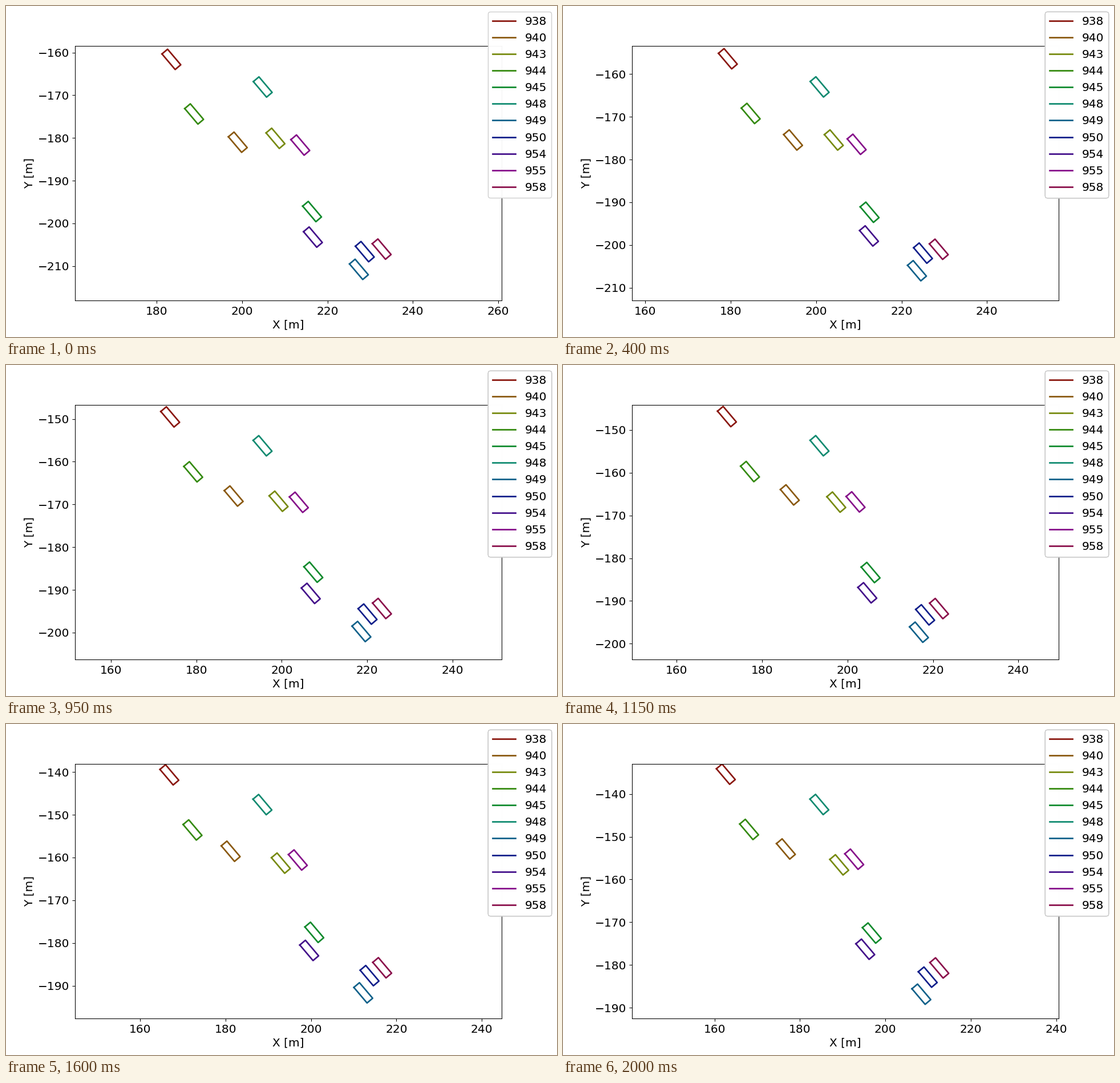
Animation of 966 by 580 pixels, one loop 2.05 s. Source, as a matplotlib script:

```python
import colorsys

import matplotlib.pyplot as plt
import numpy as np
from matplotlib.animation import FuncAnimation

W, H, DPI = 966, 580, 96.6
FRAMES, INTERVAL = 41, 50
LENGTH, WIDTH = 4.78, 1.72
BODY_ANGLE = 49.7
ROAD = np.radians(128.4)
HALF_X = 50
MAX_LEGENDS = 8

# id: start x, start y, metres driven in one loop
CARS = {
    938: (183.45, -161.60, 33.5),
    940: (199.01, -180.99, 35.9),
    943: (207.83, -180.08, 30.0),
    944: (188.78, -174.38, 33.3),
    945: (216.40, -197.22, 31.5),
    948: (204.85, -168.07, 32.7),
    949: (227.37, -210.75, 30.5),
    950: (228.75, -206.60, 30.3),
    954: (216.60, -203.20, 34.3),
    955: (213.64, -181.66, 33.7),
    958: (232.70, -206.01, 32.3),
}

plt.rcParams.update({"font.family": "DejaVu Sans", "font.size": 15})

# The tiny margin keeps the pixel size from rounding down
fig, ax = plt.subplots(figsize=((W + 1e-6) / DPI, (H + 1e-6) / DPI), dpi=DPI)
ax.set_xlabel("X [m]")
ax.set_ylabel("Y [m]")
area = ax.get_position()
HALF_Y = HALF_X * area.height * H / (area.width * W)

table = np.array(list(CARS.values()))
starts, driven = table[:, :2], table[:, 2:]
heading = np.array([np.cos(ROAD), np.sin(ROAD)])


def car_shape():
    a = np.radians(-BODY_ANGLE)
    u = np.array([np.cos(a), np.sin(a)]) * LENGTH / 2
    v = np.array([-np.sin(a), np.cos(a)]) * WIDTH / 2
    return np.array([-u - v, -u + v, u + v, u - v, -u - v])


def progress(i):
    """Share of the way driven, with a slight slowdown in mid-loop."""
    t = i / (FRAMES - 1)
    return t - 0.015 * np.sin(np.pi * t) ** 4


SHAPE = car_shape()
lines = []
for k, name in enumerate(CARS):
    color = colorsys.hls_to_rgb(k / len(CARS) + 0.01, 0.3, 0.8)
    lines += ax.plot([], [], color=color, lw=2, label=str(name))

# One more translucent legend piles up on every frame
legends = [fig.legend() for _ in range(MAX_LEGENDS)]


def update(i):
    centers = starts + heading * driven * progress(i)
    cx, cy = centers.mean(axis=0)
    ax.set_xlim(cx - HALF_X, cx + HALF_X)
    ax.set_ylim(cy - HALF_Y, cy + HALF_Y)
    for line, center in zip(lines, centers):
        line.set_data(*(SHAPE + center).T)
    for k, legend in enumerate(legends):
        legend.set_visible(k < i + 2)
    return lines


anim = FuncAnimation(fig, update, frames=FRAMES, interval=INTERVAL,
                     repeat=True, repeat_delay=0)
plt.show()
```
